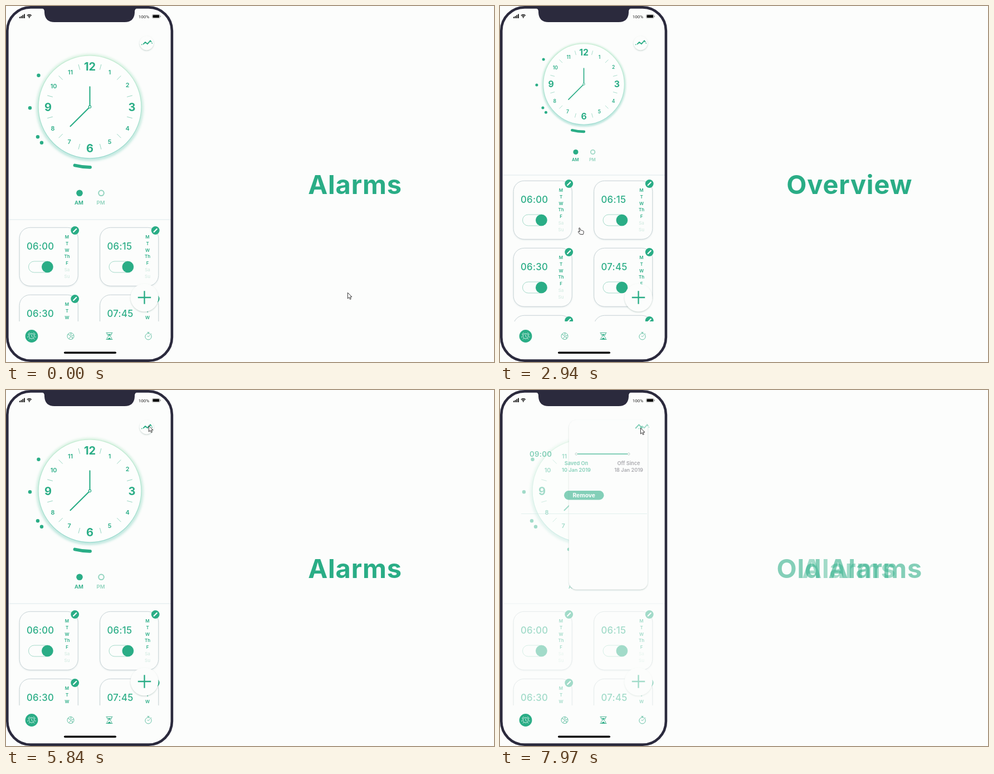
Animation of 876 by 640 pixels, one loop 8000 ms. Source, as an HTML page:

```html
<!DOCTYPE html>
<html lang="en">
<head>
<meta charset="utf-8">
<title>Alarm app</title>
<style>
  html, body { margin: 0; width: 100%; height: 100%; overflow: hidden; background: #fcfdfc; }
  svg { display: block; width: 100vw; height: 100vh; font-family: Inter, "Open Sans", sans-serif; }
</style>
</head>
<body>
<svg id="stage" viewBox="0 0 876 640" xmlns="http://www.w3.org/2000/svg"></svg>
<script>
const GREEN = '#2aad86', PALE = '#93d4bf', FAINT = '#d3ebe2', DARK = '#2b2a3d', PAPER = '#fcfdfc';
const LOOP = 8000, MOVE = 500;
const stage = document.getElementById('stage');
const $ = id => document.getElementById(id);

// Text centred vertically on cy
const text = (x, cy, size, str, { fill = GREEN, weight = 600, anchor = 'middle', extra = '' } = {}) =>
  `<text x="${x}" y="${cy + size * 0.364}" font-size="${size}" font-weight="${weight}" fill="${fill}" text-anchor="${anchor}" ${extra}>${str}</text>`;
const circle = (x, y, r, attrs = `fill="${GREEN}"`) => `<circle cx="${x}" cy="${y}" r="${r}" ${attrs}/>`;
const path = (d, width, color = GREEN, extra = '') =>
  `<path d="${d}" fill="none" stroke="${color}" stroke-width="${width}" ${extra}/>`;
const ROUND = 'stroke-linecap="round" stroke-linejoin="round"';

const defs = `<defs>
  <filter id="glow" x="-20%" y="-20%" width="140%" height="140%"><feGaussianBlur stdDeviation="2.2"/></filter>
  <filter id="drop" x="-30%" y="-30%" width="160%" height="160%">
    <feDropShadow dx="0" dy="1.2" stdDeviation="1.3" flood-color="#3c6e62" flood-opacity=".32"/></filter>
  <filter id="soft" x="-20%" y="-20%" width="140%" height="140%">
    <feDropShadow dx="0" dy="1" stdDeviation="1" flood-color="#5a7f8c" flood-opacity=".18"/></filter>
  <linearGradient id="rim" x1="0" y1="0" x2="0" y2="1">
    <stop offset="0" stop-color="#c5ecd2"/><stop offset="1" stop-color="#97d9cd"/></linearGradient>
  <clipPath id="listClip"><rect id="listBox" x="5" y="384" width="291" height="183"/></clipPath>
</defs>`;

// Clock drawn around its own centre
function clock() {
  let s = circle(0, 1, 93.5, 'fill="none" stroke="url(#rim)" stroke-width="5" opacity=".7" filter="url(#glow)"')
    + circle(0, 0, 92.5, 'fill="#fdfefd" stroke="url(#rim)" stroke-width="1.3"');
  for (let i = 0; i < 12; i++)
    s += `<path d="M0 -69V-79" stroke="${PALE}" stroke-width=".9" transform="rotate(${15 + i * 30})"/>`;
  const hours = [[0, -72.5], [35.5, -62], [67.5, -39], [75.5, 0], [67.5, 39], [35.5, 62.5],
                 [0, 74], [-37, 62.5], [-66.5, 39], [-75, 0], [-65, -37], [-35, -62]];
  hours.forEach(([x, y], i) => {
    const big = i % 3 === 0;
    s += text(x, y, big ? 20 : 10.8, i || 12, { weight: big ? 700 : 600 });
  });
  s += path('M0 -2V-36M-1.6 1.6L-35 35', 2.1, GREEN, ROUND)
    + circle(0, 0, 2.2, `fill="${PAPER}" stroke="${GREEN}" stroke-width="1.2"`);
  [[-92, -56.5], [-107.5, 2], [-93.5, 54], [-86.5, 64.5]].forEach(([x, y]) => s += circle(x, y, 3.2));
  s += path('M-27 105.2Q-13 108.6 0.5 108.5', 5.8, GREEN, ROUND);
  s += circle(-18.5, 155, 5.8) + text(-19.5, 172.5, 9.6, 'AM')
    + circle(20.5, 155, 4.8, `fill="none" stroke="${PALE}" stroke-width="2"`)
    + text(19.5, 172.5, 9.6, 'PM', { fill: PALE });
  return s;
}

function card(time, i) {
  const x = i % 2 * 144.5 + 24, row = i >> 1, on = time !== '09:00';
  const badge = 5.5 + row * 2;
  let s = `<g transform="translate(${x} ${row * 121})">
    <rect x=".2" y=".3" width="105" height="105" rx="19" fill="${PAPER}" stroke="#c3d0d3" stroke-width=".9" filter="url(#soft)"/>`;
  s += text(13, 34, 16.7, time, { weight: 500, anchor: 'start', fill: on ? GREEN : PALE, extra: 'letter-spacing=".3"' });
  s += `<rect x="16.5" y="61" width="44" height="20" rx="10" fill="${PAPER}" stroke="#9cd6c4" stroke-width=".9"/>`;
  s += on ? circle(50.3, 71, 10.3) : circle(26.5, 71, 9.8, `fill="${PAPER}" stroke="${GREEN}" stroke-width=".9"`);
  ['M', 'T', 'W', 'Th', 'F', 'Sa', 'Su'].forEach((d, k) =>
    s += text(85.5, 17.5 + k * 11.7, 7.9, d, { fill: k > 4 ? FAINT : GREEN, weight: k > 4 ? 500 : 600 }));
  s += circle(99.7, badge, 7.4)
    + path(`M97.2 ${badge + 2.6}L102.2 ${badge - 2.6}`, 2.2, '#fff', 'stroke-linecap="round"');
  return s + '</g>';
}

function panelInfo() {
  const grey = { fill: '#6c6b75' };
  return text(53, 115, 13.2, '09:00', { anchor: 'start', weight: 600, extra: 'letter-spacing=".3"' })
    + path('M139 115H229', 2)
    + [137, 231].map(x => circle(x, 115, 2, `fill="${PAPER}" stroke="#8fb5aa" stroke-width="1"`)).join('')
    + text(137, 132, 9.2, 'Saved On') + text(137, 143.2, 9.1, '10 Jan 2019')
    + text(231, 132, 9.2, 'Off Since', grey) + text(231, 143.2, 9.1, '18 Jan 2019', grey)
    + `<rect x="115" y="181" width="71.5" height="16.5" rx="8.2" fill="${GREEN}"/>`
    + text(150.7, 189.3, 10.3, 'Remove', { fill: '#fff', weight: 700 })
    + path('M38 222.5H264', 1, '#cfe7e4');
}

function navBar() {
  const thin = '#4fb797';
  return circle(46, 593.5, 11.4)
    + circle(46, 593.5, 4.7, 'fill="none" stroke="#fff" stroke-width=".8"')
    + path('M46 590.5V593.8L48 595.6M40.3 591.6Q39.6 588.4 43 587.7M51.7 591.6Q52.4 588.4 49 587.7M42.5 597.5L41 599.4M49.5 597.5L51 599.4M39 594V596M53 594V596', .8, '#fff')
    + circle(116, 593.5, 6, `fill="none" stroke="${thin}" stroke-width=".9"`)
    + path('M111 590.5L114.5 591.5L116 594.5L113 598M117 588L116.2 591L119 593L121.5 591.5M116 594.5L119.5 595.5L119 598.5', .9, thin)
    + path('M179.5 587.5H191.5M179.5 599.5H191.5M181 588Q181 592 184.7 593.5Q181 595 181 599M190 588Q190 592 186.3 593.5Q190 595 190 599', 1, thin)
    + `<path d="M182.2 590H188.8L185.5 593ZM182 599L185.5 596L189 599Z" fill="${GREEN}"/>`
    + circle(255.5, 594.3, 5.6, `fill="none" stroke="${thin}" stroke-width=".9"`)
    + path('M253.5 586.8H257.5M255.5 587V588.7M260 588.8L261.4 590.2M255.5 594.5L258 592M255.5 594.5L253.6 593.2', .9, thin);
}

function phone() {
  return `<rect x="2.3" y="2.4" width="295.6" height="635.2" rx="42" fill="none" stroke="${DARK}" stroke-width="4.6"/>
    <path d="M64 3.5Q69 5 69 10V12Q70 29 87 29H213Q230 29 231 12V10Q231 5 236 3.5Z" fill="${DARK}"/>
    <path d="M24 19.5h1.8V22H24ZM26.7 18h1.8v4h-1.8ZM29.4 16.2h1.8V22h-1.8ZM32.1 14.5h1.8V22h-1.8Z" fill="#111"/>`
    + path('M37.8 17.3Q41.8 13.6 45.8 17.3M39.5 19Q41.8 17 44.1 19', 1.3, '#111') + circle(41.8, 20.6, 1.1, 'fill="#111"')
    + text(247.5, 18.6, 8.1, '100%', { fill: '#222', weight: 400, extra: 'font-family="Roboto, sans-serif"' })
    + `<rect x="262.6" y="15.4" width="13.4" height="6.6" rx="1.6" fill="none" stroke="#777" stroke-width=".6"/>
    <rect x="263.6" y="16.3" width="11.4" height="4.8" rx=".8" fill="#000"/>
    <rect x="276.7" y="17.4" width="1" height="2.6" fill="#777"/>
    <rect x="104" y="621.4" width="94" height="3.6" rx="1.8" fill="#000"/>`;
}

const title = (id, x, str) =>
  `<text id="${id}" x="${x}" y="338" font-size="47" font-weight="700" fill="${GREEN}" text-anchor="middle" letter-spacing=".8">${str}</text>`;

stage.innerHTML = defs + `<rect width="876" height="640" fill="${PAPER}"/>
  <g id="main">
    <g id="clock">${clock()}</g>
    <path id="divider" d="M5 0H296" stroke="#dde7ea" stroke-width="1"/>
    <g clip-path="url(#listClip)"><g id="list">${
      ['06:00', '06:15', '06:30', '07:45', '08:00', '09:00'].map(card).join('')}</g></g>
    ${circle(248.5, 524.3, 25, `fill="${PAPER}" filter="url(#drop)"`)}
    ${path('M236.8 524H260.2M248.5 512.3V535.7', 2.3)}
  </g>
  <rect id="panel" fill="${PAPER}" filter="url(#drop)"/>
  <g id="info">${panelInfo()}</g>
  <g id="zigzag">${path('M246.2 68.8L250 65L254 68.2L259 62.3L261 64.8', 1.9, GREEN, 'stroke-linejoin="round"')
    + circle(243.8, 69.3, .9) + circle(262.2, 66.8, .9)}</g>
  <g id="chevron">${path('M247 69L253.2 62.4L259.6 69', 2)}</g>
  ${navBar()}${phone()}
  ${title('alarms', 626.5, 'Alarms')}${title('overview', 627.3, 'Overview')}${title('old', 627.3, 'Old Alarms')}
  <g id="cursor">
    <path id="arrow" d="M.4 .4V11L2.9 8.7L4.6 12.4L6.3 11.6L4.7 8H8Z" fill="#fff" stroke="#222" stroke-width=".9" stroke-linejoin="round"/>
    <path id="hand" d="M-1.6 6.2L-4.6 2.4Q-4.8 .6 -3 1.2L-1.8 2.2L-3.4 -4.2Q-3 -6 -1.6 -4.8L-.4 -.8Q.8 -1.8 1.6 -.4Q2.8 -1 3.6 .2Q5 0 5.2 1.6L5 4.4L4 6.8Z" fill="#fff" stroke="#222" stroke-width=".9" stroke-linejoin="round"/>
  </g>`;

const clamp = v => Math.min(1, Math.max(0, v));
const ease = v => { v = clamp(v); return v * v * (3 - 2 * v); };
const mix = (a, b, p) => a + (b - a) * p;
// Rises to 1 at `from`, falls back to 0 at `to`
const pulse = (t, from, to) => ease((t - from) / MOVE) - ease((t - to) / MOVE);
const set = (id, attrs) => { for (const k in attrs) $(id).setAttribute(k, attrs[k]); };

const pointer = [[0, 613, 515], [850, 613, 515], [1530, 411, 503], [1900, 165, 470], [2200, 148, 405],
  [2940, 145, 404], [3650, 150, 290], [4150, 150, 290], [4700, 225, 262], [5450, 256, 64],
  [6600, 256, 64], [7200, 250, 58], [7500, 250, 58], [7800, 252, 68], [LOOP, 252, 68]];

function pointerAt(t) {
  const i = pointer.findIndex(k => k[0] > t);
  const [t0, x0, y0] = pointer[i - 1], [t1, x1, y1] = pointer[i];
  const p = ease((t - t0) / (t1 - t0));
  return [mix(x0, x1, p), mix(y0, y1, p)];
}

function draw(t) {
  const over = pulse(t, 2000, 4532);
  const open = pulse(t, 6000, 7745);
  const line = mix(384, 304, over);
  const scroll = 115 * ease((t - 2960) / 690) * over;

  set('clock', { transform: `translate(150.5 ${mix(181.3, 140.5, over)}) scale(${mix(1, .787, over)})` });
  set('divider', { transform: `translate(0 ${line})` });
  set('listBox', { y: line, height: 567 - line });
  set('list', { transform: `translate(0 ${mix(398, 314, over) - scroll})` });
  set('main', { opacity: 1 - open });

  const left = mix(239.8, 37, open);
  set('panel', { x: left, y: 54, width: 265 - left, height: mix(25.2, 513.5, open), rx: mix(12.6, 14, open) });
  set('info', { opacity: open });
  set('zigzag', { opacity: 1 - open, transform: `translate(${9 * open} 0)` });
  set('chevron', { opacity: open, transform: `translate(${-9 * (1 - open)} 0)` });

  set('alarms', { opacity: 1 - over - open });
  set('overview', { opacity: over });
  set('old', { opacity: open });

  const [x, y] = pointerAt(t), grab = t > 2000 && t < 3900;
  set('cursor', { transform: `translate(${x} ${y})` });
  set('arrow', { opacity: grab ? 0 : 1 });
  set('hand', { opacity: grab ? 1 : 0 });
}

const start = performance.now();
function tick() {
  draw((performance.now() - start) % LOOP);
  requestAnimationFrame(tick);
}
tick();
</script>
</body>
</html>
```
